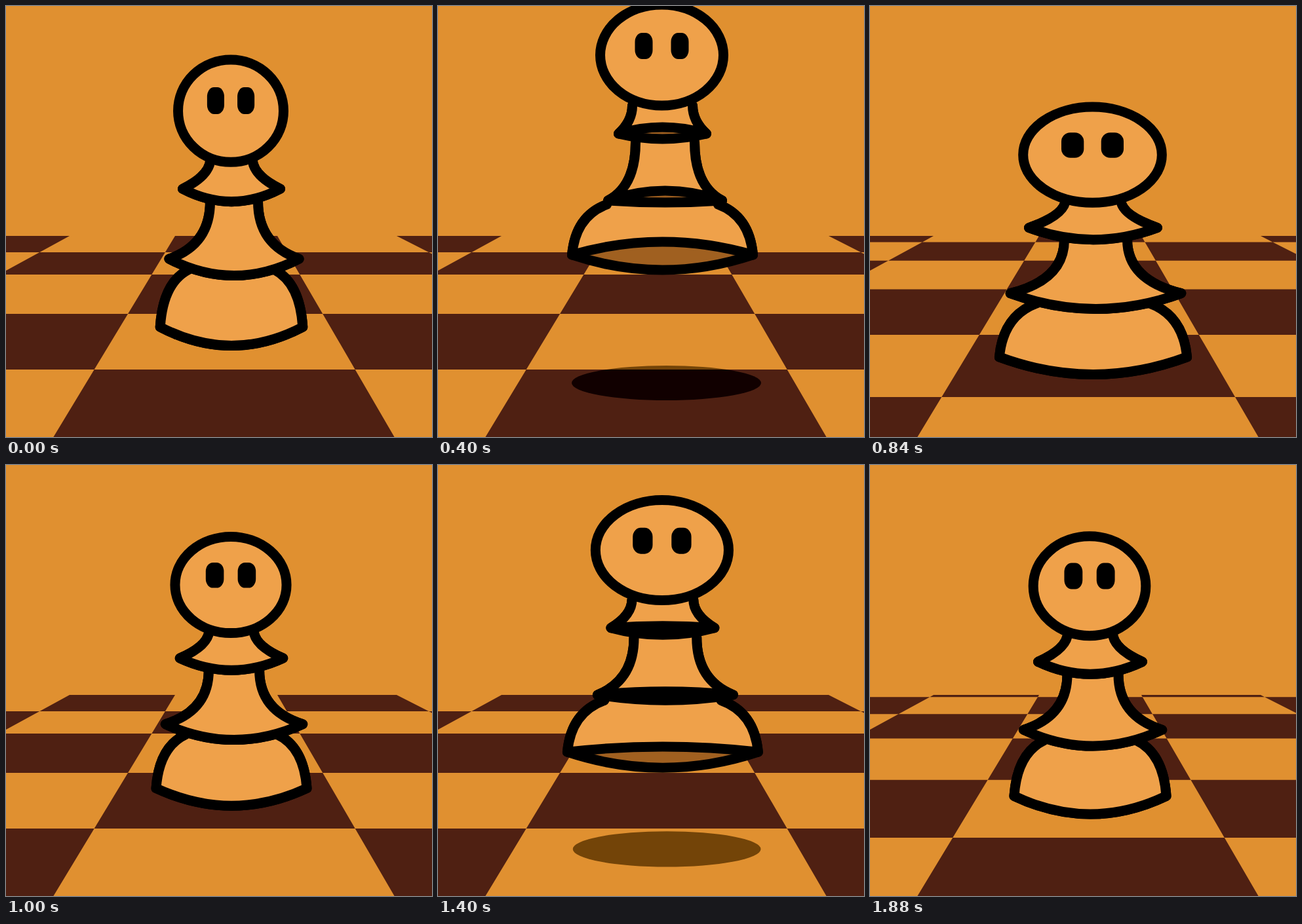
An HTML page that plays this animation: 650x658 px, repeating every 1920 ms.

```html
<!DOCTYPE html>
<html lang="en">
<head>
<meta charset="utf-8">
<title>Hopping pawn</title>
<style>
html, body { margin: 0; width: 100%; height: 100%; overflow: hidden; background: #e09030; }
svg { display: block; width: 100vw; height: 100vh; }
</style>
</head>
<body>
<svg viewBox="0 0 650 658" preserveAspectRatio="none">
  <defs><clipPath id="darkClip"><path id="clipSquares"/></clipPath></defs>
  <rect width="650" height="658" fill="#e09030"/>
  <ellipse class="shadow" fill="#734408"/>
  <path id="squares" fill="#4f2012"/>
  <g clip-path="url(#darkClip)"><ellipse class="shadow" fill="#110000"/></g>
  <g id="pawn" stroke="#000" stroke-width="15" stroke-linejoin="round" stroke-linecap="round"></g>
</svg>
<script>
const LOOP = 1920, HOP = 960, STEP = 40, SHIFT_START = 640;
const WOOD = '#efa14a', UNDER = '#a06020';

const lerp = (a, b, k) => a + (b - a) * k;

// Blends two poses, however deeply their numbers are nested.
const mix = (a, b, k) => typeof a === 'number' ? lerp(a, b, k) :
  Object.fromEntries(Object.keys(a).map(name => [name, mix(a[name], b[name], k)]));

// A flared ring: half widths and heights of its neck and rim, then the sag of
// the rim's front edge and of its lower edge. They part when the pawn tips back.
const skirt = (neck, top, spread, rim, front, low = front) => ({ neck, top, spread, rim, front, low });
const oval = (y, rx, ry, gap = 0) => ({ y, rx, ry, gap });

const stand = (x, floor, w, h) => ({
  x,
  head: oval(floor - 479 * h, 108 * w, 104.5 * h),
  eyes: oval(floor - 500 * h, 17.5 * w, 27.5 * h, 31 * w),
  collar: skirt(43 * w, floor - 382 * h, 100 * w, floor - 320 * h, 26 * h),
  waist: skirt(49 * w, floor - 294 * h, 133 * w, floor - 177 * h, 34 * h),
  base: skirt(88 * w, floor - 155 * h, 146 * w, floor - 38 * h, 38 * h)
});

const rising = {
  x: 344,
  head: oval(80, 119, 77),
  eyes: oval(66, 20, 20, 34),
  collar: skirt(70, 150, 84, 180, 8),
  waist: skirt(47, 190, 114, 253, 17),
  base: skirt(102, 262, 148, 320, 17)
};

const falling = {
  x: 342.5,
  head: oval(75, 94, 77),
  eyes: oval(61, 13.5, 20, 27.5),
  collar: skirt(46, 152, 67, 195, -10, 8),
  waist: skirt(45, 208, 87, 297, -15, 3),
  base: skirt(85, 303, 138, 380, -20, 23)
};

const keys = [
  [0, stand(344, 518.5, .745, .748)],
  [80, stand(344, 522, .83, .66)],
  [160, stand(344, 481, .78, .79)],
  [240, rising],
  [400, falling],
  [560, stand(344, 640, 1.15, .72)],
  [640, stand(341, 644, 1, 1)],
  [800, stand(341, 580, 1.04, .69)],
  [840, stand(340.5, 562.5, .98, .7)],
  [920, stand(336, 533, .795, .727)],
  [960, stand(344, 518.5, .745, .748)]
];

// Bulge pulls the sides out towards the rim; drop sets how far down they bend.
function drawSkirt(x, { neck, top, spread, rim, front, low }, bulge, drop) {
  const bendX = lerp(neck, spread, bulge), bendY = lerp(top, rim, drop);
  const layer = (sag, fill) => `<path fill="${fill}" d="M${x - neck},${top}
    Q${x - bendX},${bendY} ${x - spread},${rim}
    Q${x},${rim + 2 * sag} ${x + spread},${rim}
    Q${x + bendX},${bendY} ${x + neck},${top}"/>`;
  return layer(low, UNDER) + layer(front, WOOD);
}

const drawEye = (x, { y, rx, ry }) => `<rect x="${x - rx}" y="${y - ry}" width="${2 * rx}"
  height="${2 * ry}" rx="${rx * .8}" ry="${ry * .7}" stroke="none"/>`;

function drawPawn(phase) {
  const next = keys.findIndex(([at]) => at > phase);
  const [fromTime, from] = keys[next - 1], [toTime, to] = keys[next];
  const { x, head, eyes, collar, waist, base } =
    mix(from, to, (phase - fromTime) / (toTime - fromTime));
  document.getElementById('pawn').innerHTML =
    drawSkirt(x, base, .9, .23) +
    drawSkirt(x + 4, waist, 0, .75) +
    drawSkirt(x, collar, 0, .55) +
    `<ellipse cx="${x - 1}" cy="${head.y}" rx="${head.rx}" ry="${head.ry}" fill="${WOOD}"/>` +
    drawEye(x - 1 - eyes.gap, eyes) + drawEye(x - 1 + eyes.gap, eyes);
}

const rows = [351, 376, 410, 470, 555, 667, 815];
const vanishing = { x: 337.5, y: 219.5 };
const horizonX = [-3000, 97, 258, 414, 596, 3600];

// Column edges fan out from the vanishing point through the far edge.
const seamX = (i, y) => lerp(vanishing.x, horizonX[i], (y - vanishing.y) / (rows[0] - vanishing.y));

function darkSquares(shift, parity) {
  const lines = rows.map((y, i) => i ? lerp(y, rows[i - 1], shift) : y);
  let d = '';
  for (let row = 0; row < lines.length - 1; row++) {
    const top = lines[row], bottom = lines[row + 1];
    for (let col = (row + parity) % 2; col < horizonX.length - 1; col += 2) {
      d += `M${seamX(col, top)},${top}L${seamX(col + 1, top)},${top} ` +
        `${seamX(col + 1, bottom)},${bottom} ${seamX(col, bottom)},${bottom}Z`;
    }
  }
  return d;
}

function drawBoard(time, phase) {
  const shift = Math.max(0, (phase - SHIFT_START) / (HOP - SHIFT_START));
  const d = darkSquares(shift, time < HOP ? 0 : 1);
  for (const id of ['squares', 'clipSquares']) document.getElementById(id).setAttribute('d', d);
}

function drawShadow(phase) {
  const k = (phase - 240) / 160;
  const shape = {
    cx: lerp(346, 348.5, k), cy: lerp(532, 575.5, k),
    rx: lerp(149, 144.5, k), ry: lerp(24, 26.5, k),
    visibility: phase >= 160 && phase < 560 ? 'visible' : 'hidden'
  };
  for (const shadow of document.querySelectorAll('.shadow')) {
    for (const name in shape) shadow.setAttribute(name, shape[name]);
  }
}

function draw(elapsed) {
  const time = Math.floor((elapsed % LOOP) / STEP) * STEP;
  const phase = time % HOP;
  drawBoard(time, phase);
  drawShadow(phase);
  drawPawn(phase);
}

let start;
function tick(now) {
  start ??= now;
  draw(now - start);
  requestAnimationFrame(tick);
}
draw(0);
requestAnimationFrame(tick);
</script>
</body>
</html>
```
